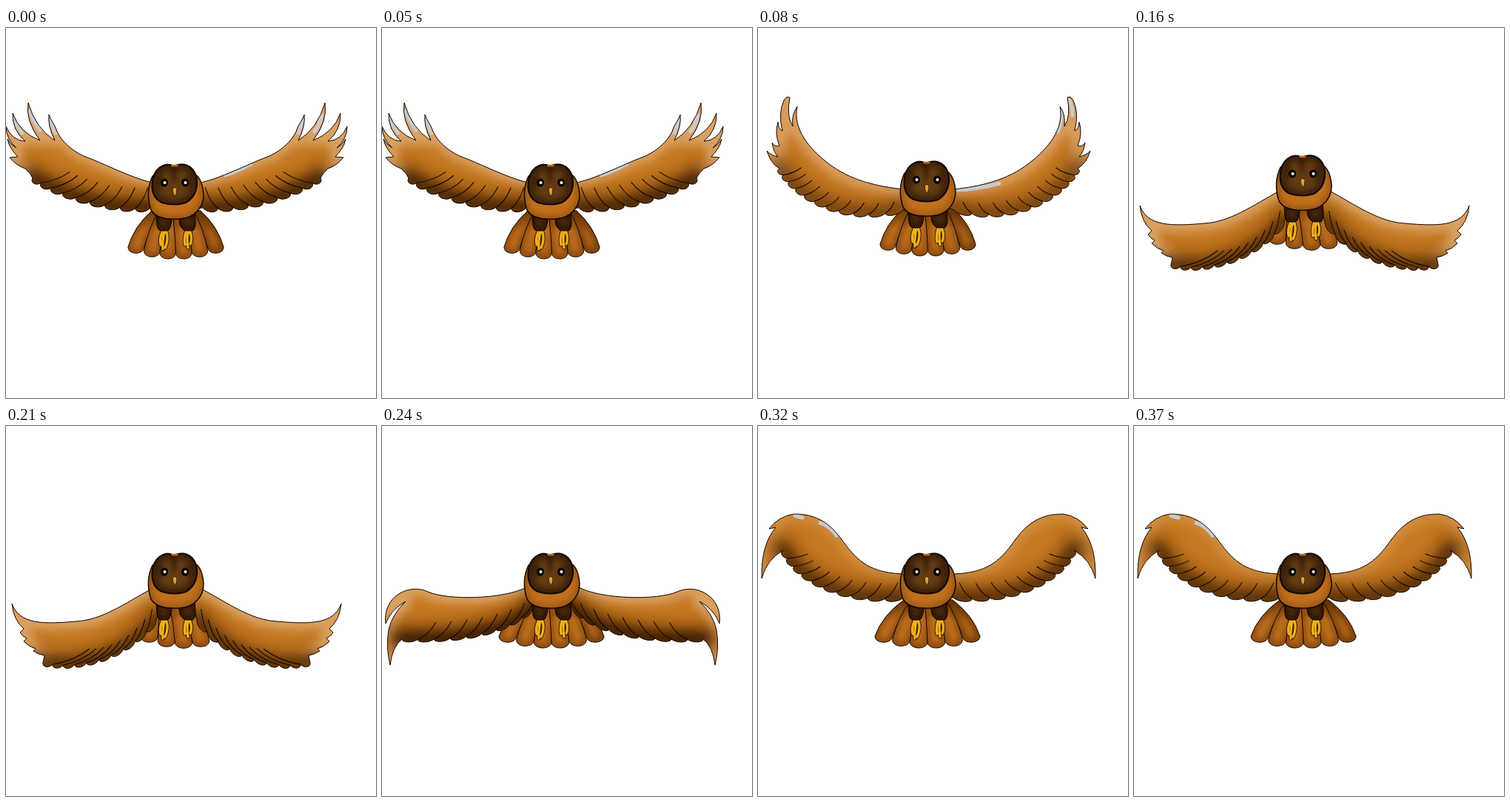
Animation of 500 by 500 pixels, one loop 400 ms. Source, as an HTML page with a canvas:

```html
<!DOCTYPE html>
<html lang="en">
<head>
<meta charset="utf-8">
<title>Flying owl</title>
<style>
  html, body { margin: 0; width: 100%; height: 100%; overflow: hidden; background: #fff; }
  canvas { display: block; }
</style>
</head>
<body>
<canvas id="stage" width="500" height="500"></canvas>
<script>
const ctx = document.getElementById('stage').getContext('2d');
const STEP = 80;
const MIRROR = 461;
const INK = '#120800';

// Left wing per pose: leading edge and tip, then the trailing edge as a cubic.
// vein: feather line direction at the tip and at the body.
// glow: [width, alpha] of the lit edge; shade: alpha of the dark edge.
const poses = [
  {
    dy: 12, tail: [165, 294, 6], lobes: 9, amp: 7, vein: [42, -13, 17, -28], glow: [16, .6], shade: .7,
    lead: 'M198 209C170 203 130 182 105 173C86 164 75 152 69 140C65 128 61 126 58 117Q56 132 66 152' +
      'Q40 136 30 101Q26 126 46 152Q18 141 9 115Q8 138 26 153Q8 152 0 133Q0 150 14 162' +
      'Q6 158 2 150Q4 162 16 174L5 175Q14 186 26 190Q34 197 36 203',
    trail: [36, 203, 65, 222, 135, 248, 195, 243],
    grey: ['M32 112Q36 126 46 138M60 122Q62 134 67 142M10 122Q14 134 22 142',
      'M165 199Q145 192 130 184M34 118Q38 132 44 140M60 125L66 142']
  },
  {
    dy: 8, tail: [165, 294, 6], lobes: 11, amp: 6, vein: [25, -9, 12, -15], glow: [22, .55], shade: .4,
    lead: 'M197 218C160 214 125 206 95 183C68 162 47 136 53 106Q45 117 47 133Q38 119 43 94' +
      'Q39 91 35 98Q27 115 33 139Q27 136 27 127Q22 143 29 159Q22 161 19 155Q21 168 27 174' +
      'Q17 172 12 166Q17 183 29 190',
    trail: [29, 190, 45, 220, 105, 268, 196, 246],
    grey: ['', 'M53 108Q48 122 56 140M40 98Q36 106 36 118M195 219Q165 218 135 210']
  },
  {
    dy: 0, tail: [182, 298, 5], lobes: 10, amp: 6, vein: [55, -20, 8, -30], glow: [20, .6], shade: .6,
    lead: 'M195 221C160 240 130 262 95 264C50 268 18 268 8 240Q10 262 24 274L19 279' +
      'Q22 284 28 287L24 291Q32 299 40 301L37 304Q44 309 52 310L50 320',
    trail: [50, 320, 90, 330, 160, 318, 203, 262],
    grey: ['', '']
  },
  {
    dy: 0, tail: [158, 300, 6], lobes: 9, amp: 5, vein: [25, -22, 19, -29], glow: [18, .6], shade: .8,
    lead: 'M195 218C165 234 90 236 62 224C40 214 18 226 10 240Q3 252 5 267Q12 248 32 237' +
      'Q14 254 9 275Q5 300 11 323Q14 298 27 288',
    trail: [27, 288, 90, 290, 165, 285, 203, 247],
    grey: ['', '']
  },
  {
    dy: 0, tail: [158, 300, 6], lobes: 10, amp: 6, vein: [28, -4, 17, -21], glow: [18, .3], shade: .6,
    lead: 'M196 200C160 198 140 190 118 160C105 142 88 118 48 119Q28 122 15 139L24 137' +
      'Q4 160 5 206Q12 180 34 168',
    trail: [34, 168, 50, 205, 110, 240, 197, 232],
    grey: ['M50 121L60 124M84 131Q96 134 106 148', '']
  }
];

const mix = (a, b, t) => a + (b - a) * t;

function cubic([x0, y0, x1, y1, x2, y2, x3, y3], t) {
  const u = 1 - t;
  const at = (a, b, c, d) => u * u * u * a + 3 * u * u * t * b + 3 * u * t * t * c + t * t * t * d;
  return [at(x0, x1, x2, x3), at(y0, y1, y2, y3)];
}

function stroke(path, color, width, blur = 0, alpha = 1) {
  ctx.save();
  ctx.strokeStyle = color;
  ctx.lineWidth = width;
  ctx.globalAlpha = alpha;
  if (blur) ctx.filter = `blur(${blur}px)`;
  ctx.stroke(new Path2D(path));
  ctx.restore();
}

// Fills a shape, paints soft strokes inside it, then outlines it.
function shaded(path, fill, shades, line = 1.3) {
  const shape = new Path2D(path);
  ctx.fillStyle = fill;
  ctx.fill(shape);
  ctx.save();
  ctx.clip(shape);
  for (const shade of shades) stroke(...shade);
  ctx.restore();
  stroke(path, INK, line);
}

function wing(pose, side) {
  const { dy, lead, trail, lobes, amp, vein, glow, shade } = pose;
  let outline = lead, veins = '';
  for (let i = 0; i < lobes; i++) {
    const [x0, y0] = cubic(trail, i / lobes);
    const [x1, y1] = cubic(trail, (i + 1) / lobes);
    const len = Math.hypot(x1 - x0, y1 - y0);
    const nx = -(y1 - y0) / len * amp, ny = (x1 - x0) / len * amp;
    outline += `C${x0 + nx} ${y0 + ny} ${mix(x0, x1, .7) + nx} ${mix(y0, y1, .7) + ny} ${x1} ${y1}`;
    const t = i / (lobes - 1);
    const dx = mix(vein[0], vein[2], t), dy = mix(vein[1], vein[3], t);
    if (i) veins += `M${x0} ${y0}q${dx * .6} ${dy * .25} ${dx} ${dy}`;
  }
  outline += `L212 ${232 + dy}Z`;
  const [ax, ay, ...rest] = trail;
  const edge = `M${ax} ${ay}C${rest.join(' ')}`;
  ctx.save();
  if (side) ctx.transform(-1, 0, 0, 1, MIRROR, 0);
  shaded(outline, '#c67a22', [
    [lead, '#e6b98c', glow[0], 6, glow[1]],
    [edge, '#8a4a08', 54, 9, shade * .7],
    [edge, '#2c1300', 24, 7, shade],
    [pose.grey[side], '#c8cacf', 5, .6],
    [veins, INK, 1.1]
  ], 1);
  ctx.restore();
}

function tail([left, right, count]) {
  const fill = ctx.createLinearGradient(0, 240, 0, 300);
  fill.addColorStop(0, '#8a480c');
  fill.addColorStop(.4, '#c0701d');
  fill.addColorStop(1, '#b5651a');
  const middle = (count - 1) / 2;
  const order = [...Array(count).keys()].sort((a, b) => Math.abs(b - middle) - Math.abs(a - middle));
  for (const i of order) {
    const x0 = mix(left, right, i / count), x1 = mix(left, right, (i + 1) / count);
    const y = 292 - 8 * ((i - middle) / middle) ** 2;
    const r0 = mix(197, 253, i / count), r1 = mix(207, 263, (i + 1) / count);
    const lobe = `M${r0} 235Q${mix(r0, x0, .75)} ${y - 28} ${x0} ${y}` +
      `C${x0} ${y + 11} ${x1} ${y + 11} ${x1} ${y}Q${mix(r1, x1, .75)} ${y - 28} ${r1} 235Z`;
    shaded(lobe, fill, [[lobe, '#4a2102', i === count - 1 ? 12 : 6, 4, .6]], 1);
  }
}

function ellipse(x, y, rx, ry, color) {
  ctx.fillStyle = color;
  ctx.beginPath();
  ctx.ellipse(x, y, rx, ry, 0, 0, 7);
  ctx.fill();
}

function body() {
  const legs = 'M203 238L204 254Q206 264 214 262Q221 264 223 252L225 238Z' +
    'M233 238L235 254Q240 263 246 262Q255 265 256 252L255 238Z';
  shaded(legs, '#4f2a0c', [[legs, '#1d0c00', 8, 4, .8]]);

  const claws = 'M211 264Q207 274 209 281M214 264Q211 276 212 287M217 264Q220 274 215 285' +
    'M243 264Q240 274 242 281M246 264Q244 274 246 285M249 264Q252 274 249 280';
  stroke(claws, INK, 5);
  stroke(claws, '#efad1c', 3.4);

  const ruff = 'M198 188C190 205 192 222 196 234C203 246 222 247 235 246' +
    'C255 245 267 230 267 213C266 200 262 190 256 186Z';
  shaded(ruff, '#c0701d', [[ruff, '#7a3d08', 7, 4, .7]], 1.5);

  const face = 'M227 175C217 169 203 175 199 190C195 206 199 219 211 224Q228 229 243 224' +
    'C256 217 260 203 257 188C252 173 238 169 227 175Z';
  shaded(face, '#643c14', [
    [face, '#2a1403', 12, 5, .8],
    ['M227 174V194M209 188Q206 195 208 203M247 188Q250 195 248 203', '#241103', 5, 3, .7]
  ], 2.2);
  ellipse(228, 174, 5, 1.5, '#b5651a');

  for (const x of [214, 242]) {
    ellipse(x, 197, 5, 5.5, '#080300');
    ellipse(x + .5, 197, 2.1, 2.1, '#fff');
  }
  const beak = 'M225 205Q228 202 231 205Q231 211 228.5 216Q225 211 225 205Z';
  shaded(beak, '#e6a028', [], .7);
}

function draw(pose) {
  ctx.fillStyle = '#fff';
  ctx.fillRect(0, 0, 500, 500);
  ctx.save();
  ctx.translate(0, pose.dy);
  tail(pose.tail);
  ctx.restore();
  wing(pose, 0);
  wing(pose, 1);
  ctx.save();
  ctx.translate(0, pose.dy);
  body();
  ctx.restore();
}

ctx.lineCap = ctx.lineJoin = 'round';
let shown = -1;
function tick(now) {
  const index = Math.floor(now / STEP) % poses.length;
  if (index !== shown) draw(poses[shown = index]);
  requestAnimationFrame(tick);
}
tick(0);
</script>
</body>
</html>
```
